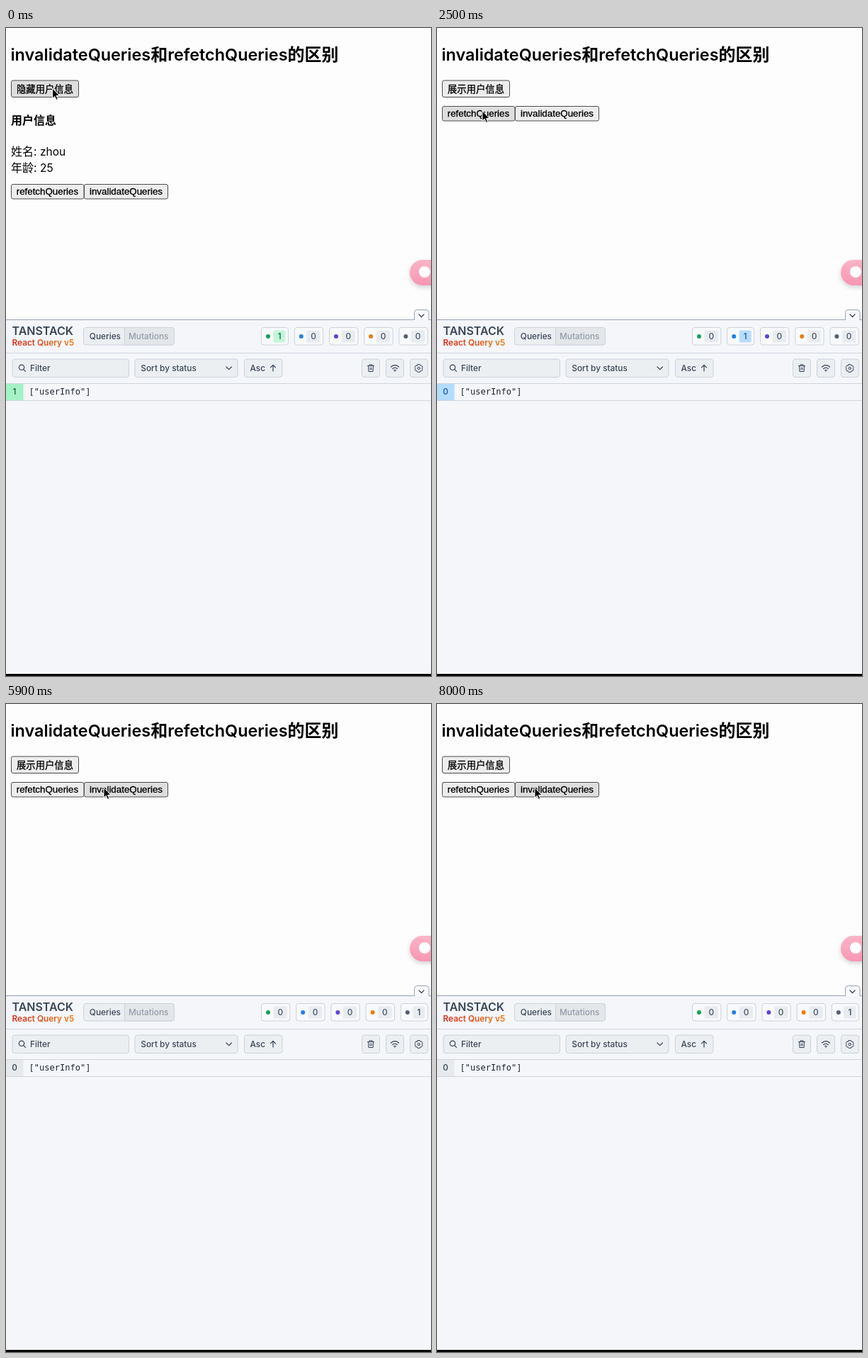
These frames come from a looping animation (600x914 px, 8100 ms). An HTML page:

```html
<!DOCTYPE html>
<html lang="zh">
<head>
<meta charset="utf-8">
<title>invalidateQueries和refetchQueries的区别</title>
<style>
html, body { margin: 0; width: 100%; height: 100%; overflow: hidden; background: #fdfdfd; }
svg { display: block; width: 100%; height: 100%; }
text { font-family: Inter, "Noto Sans CJK SC", "Noto Sans CJK", sans-serif; white-space: pre; }
.head { font-weight: 600; font-size: 23.4px; }
.head .zh { font-size: 24px; font-weight: 700; }
.body { font-size: 15.5px; }
.zh { font-family: "Noto Sans CJK SC", "Noto Sans CJK", sans-serif; font-size: 16px; }
.btn rect { fill: #ededed; stroke: #4c4c4c; }
.btn.hover rect { fill: #dedede; }
.btn text { font-family: "Liberation Sans", "Noto Sans CJK SC", "Noto Sans CJK", sans-serif; font-size: 13.33px; stroke: #000; stroke-width: .3; }
.ui text { font-size: 11.85px; font-weight: 500; fill: #3b4657; }
.box { fill: #eceff2; stroke: #ccd2da; }
.icon { fill: none; stroke: #344054; stroke-width: 1.2; stroke-linecap: round; stroke-linejoin: round; }
.thin { stroke-width: 1; }
.mid { text-anchor: middle; }
</style>
</head>
<body>
<svg viewBox="0 0 600 914" preserveAspectRatio="none">
  <defs>
    <linearGradient id="warm"><stop stop-color="#d92b1c"/><stop offset="1" stop-color="#ea7a14"/></linearGradient>
    <linearGradient id="pink" x2="0" y2="1"><stop stop-color="#fbb4c8"/><stop offset="1" stop-color="#f896b4"/></linearGradient>
    <filter id="soft" x="-50%" y="-50%" width="200%" height="200%"><feDropShadow dx="0" dy="3" stdDeviation="3" flood-opacity=".16"/></filter>
  </defs>
  <rect width="600" height="914" fill="#fdfdfd"/>

  <text class="head" x="6.5" y="46">invalidateQueries<tspan class="zh">和</tspan>refetchQueries<tspan class="zh">的区别</tspan></text>
  <g class="btn" id="toggle">
    <rect x="7.5" y="74" width="95" height="23.5" rx="2.5"/><text x="15" y="91"></text>
  </g>
  <g id="info" class="body">
    <text class="zh" x="7" y="136" font-weight="700">用户信息</text>
    <text class="zh" x="7" y="180">姓名:</text><text x="48" y="180">zhou</text>
    <text class="zh" x="7" y="203">年龄:</text><text x="48" y="203">25</text>
  </g>
  <g id="actions">
    <g class="btn" id="refetch"><rect x="7.5" y="220.5" width="102.5" height="20.5" rx="2.5"/><text x="14.7" y="235">refetchQueries</text></g>
    <g class="btn" id="invalidate"><rect x="110.5" y="220.5" width="118" height="20.5" rx="2.5"/><text x="118" y="235">invalidateQueries</text></g>
  </g>

  <rect x="570" y="327" width="60" height="36" rx="18" fill="url(#pink)" filter="url(#soft)"/>
  <circle cx="591" cy="344" r="8" fill="#fff"/>

  <g class="ui">
    <rect y="411" width="600" height="503" fill="#f4f6fa"/>
    <path d="M0 411.5H600" stroke="#98a2b0"/>
    <path d="M576.5 412V401.5q0-4 4-4h12.5q4 0 4 4V412" fill="#f7f8fa" stroke="#98a2b0"/>
    <path class="icon" d="M583 404l3.500 3.500 3.500-3.500"/>
    <path d="M0 458.500H600M0 501.500H600M0 525.500H600" stroke="#d0d6de"/>

    <text x="8.5" y="433" style="font-size:16px;font-weight:600">TANSTACK</text>
    <text x="8.5" y="448" style="font-size:11.8px;font-weight:600;fill:url(#warm)">React Query v5</text>
    <rect class="box" x="109.5" y="422.5" width="128" height="24.5" rx="3.5"/>
    <path d="M167.500 422.500H234q3.500 0 3.500 3.500v17.500q0 3.500-3.500 3.500H167.500z" fill="#e3e7ea" stroke="#ccd2da"/>
    <text x="117.800" y="439">Queries</text>
    <text x="173" y="439" style="fill:#949ca8">Mutations</text>
    <g id="badges"></g>

    <rect class="box" x="9" y="467" width="164.5" height="25.5" rx="3.5"/>
    <path class="icon" d="M25.700 478.800a3.700 3.700 0 1 0-7.400 0a3.700 3.700 0 1 0 7.400 0M24.800 481.600l2.700 2.700"/>
    <text x="34" y="484">Filter</text>
    <rect class="box" x="182" y="467" width="145" height="25.5" rx="3.5"/>
    <text x="190.300" y="484">Sort by status</text>
    <path class="icon" d="M311 478l3.700 3.700 3.700-3.700"/>
    <rect class="box" x="336.5" y="467" width="53.5" height="25.5" rx="3.5"/>
    <text x="344.5" y="484">Asc</text>
    <path class="icon" d="M377 484v-8.500M373.500 478.900l3.500-3.500 3.500 3.500"/>

    <rect class="box" x="502.5" y="467" width="25" height="25.5" rx="3.5"/>
    <path class="icon thin" d="M510.500 476.500h9M513 476.500v-1.700h4v1.700M511.500 476.500l.4 8h6.200l.4-8M514 479v3M516 479v3"/>
    <rect class="box" x="536.5" y="467" width="25" height="25.5" rx="3.5"/>
    <path class="icon" d="M543.500 478q5.500-4.600 11 0M545.700 480.500q3.300-2.700 6.600 0M547.700 482.800q1.300-1 2.600 0M549 484.200v.1"/>
    <rect class="box" x="570.5" y="467" width="25" height="25.5" rx="3.5"/>
    <path class="icon thin" d="M581.200 474.500h3l.7 1.700 1.800-.2 1.500 2.500-1.100 1.400 1.100 1.500-1.500 2.500-1.800-.2-.7 1.700h-3l-.7-1.700-1.800.2-1.500-2.500 1.100-1.500-1.100-1.400 1.500-2.500 1.800.2z"/>
    <circle class="icon thin" cx="582.700" cy="480" r="1.700"/>

    <rect id="mark" y="502" width="24.5" height="23"/>
    <text id="observers" class="mid" x="12" y="517"></text>
    <text x="32.500" y="517" style="font:12.050px 'DejaVu Sans Mono',monospace;fill:#1d2530">["userInfo"]</text>
  </g>
  <rect y="911" width="600" height="3" fill="#050505"/>
  <path id="cursor" d="M0 0V14.200l3.200-3 2.300 5.200 2.300-1-2.300-5h4.500z" stroke="#fff" stroke-linejoin="round"/>
</svg>
<script>
const LOOP = 8100, HIDE = 1400, FETCH = 2300, DONE = 3200;
const dots = ['#17a05d', '#1f7fec', '#6042e0', '#ee7b0c', '#566073'];
const looks = {
  0: { chip: '#c4f5d9', mark: '#a6f2c6', ink: '#0b6b41' },
  1: { chip: '#b8dcfd', mark: '#b4dcfd', ink: '#1751b8' },
  4: { chip: '#e8ebef', mark: '#e6eaed', ink: '#344054' }
};
// Cursor stops: time, x, y
const path = [[0, 65.5, 85], [600, 65.5, 85], [1000, 65, 88], [1500, 65, 88], [2000, 64, 117],
  [3200, 64, 117], [3700, 132, 118], [4600, 132, 118], [5100, 138, 118], [LOOP, 138, 118]];
const $ = id => document.getElementById(id);
const label = $('toggle').querySelector('text');

function cursorAt(t) {
  const i = path.findIndex(p => p[0] > t);
  const [t0, x0, y0] = path[i - 1], [t1, x1, y1] = path[i];
  const u = (t - t0) / (t1 - t0), e = u * u * (3 - 2 * u);
  return [x0 + (x1 - x0) * e, y0 + (y1 - y0) * e];
}

function badges(active) {
  let x = 360.5;
  return dots.map((dot, i) => {
    const on = i === active, w = on ? 38 : 40.4, left = x;
    x += w + 8.8;
    return `<rect x="${left}" y="422.5" width="${w}" height="24.5" rx="3.5" fill="#f8f9fb" stroke="#ccd2da"/>
      <circle cx="${left + 9.5}" cy="435" r="3" fill="${dot}"/>
      <rect x="${left + 17}" y="426.5" width="${w - 21}" height="17" rx="2" fill="${on ? looks[i].chip : '#e8ebef'}"/>
      <text class="mid" x="${left + w / 2 + 6.6}" y="439" style="fill:${on ? looks[i].ink : '#475467'}">${+on}</text>`;
  }).join('');
}

let shown;
function setStatus(s) {
  if (s === shown) return;
  shown = s;
  $('badges').innerHTML = badges(s);
  $('mark').setAttribute('fill', looks[s].mark);
  $('observers').style.fill = looks[s].ink;
  $('observers').textContent = s === 0 ? 1 : 0;
}

function draw(now) {
  const t = now % LOOP, hidden = t >= HIDE, [x, y] = cursorAt(t);
  setStatus(!hidden ? 0 : t >= FETCH && t < DONE ? 1 : 4);
  label.textContent = hidden ? '展示用户信息' : '隐藏用户信息';
  $('info').style.display = hidden ? 'none' : '';
  $('actions').setAttribute('transform', `translate(0 ${hidden ? -110 : 0})`);
  $('cursor').setAttribute('transform', `translate(${x} ${y})`);
  const onRow = hidden && y > 110;
  $('toggle').classList.toggle('hover', y < 98);
  $('refetch').classList.toggle('hover', onRow && x < 110);
  $('invalidate').classList.toggle('hover', onRow && x >= 110);
  requestAnimationFrame(draw);
}
draw(performance.now());
</script>
</body>
</html>
```
